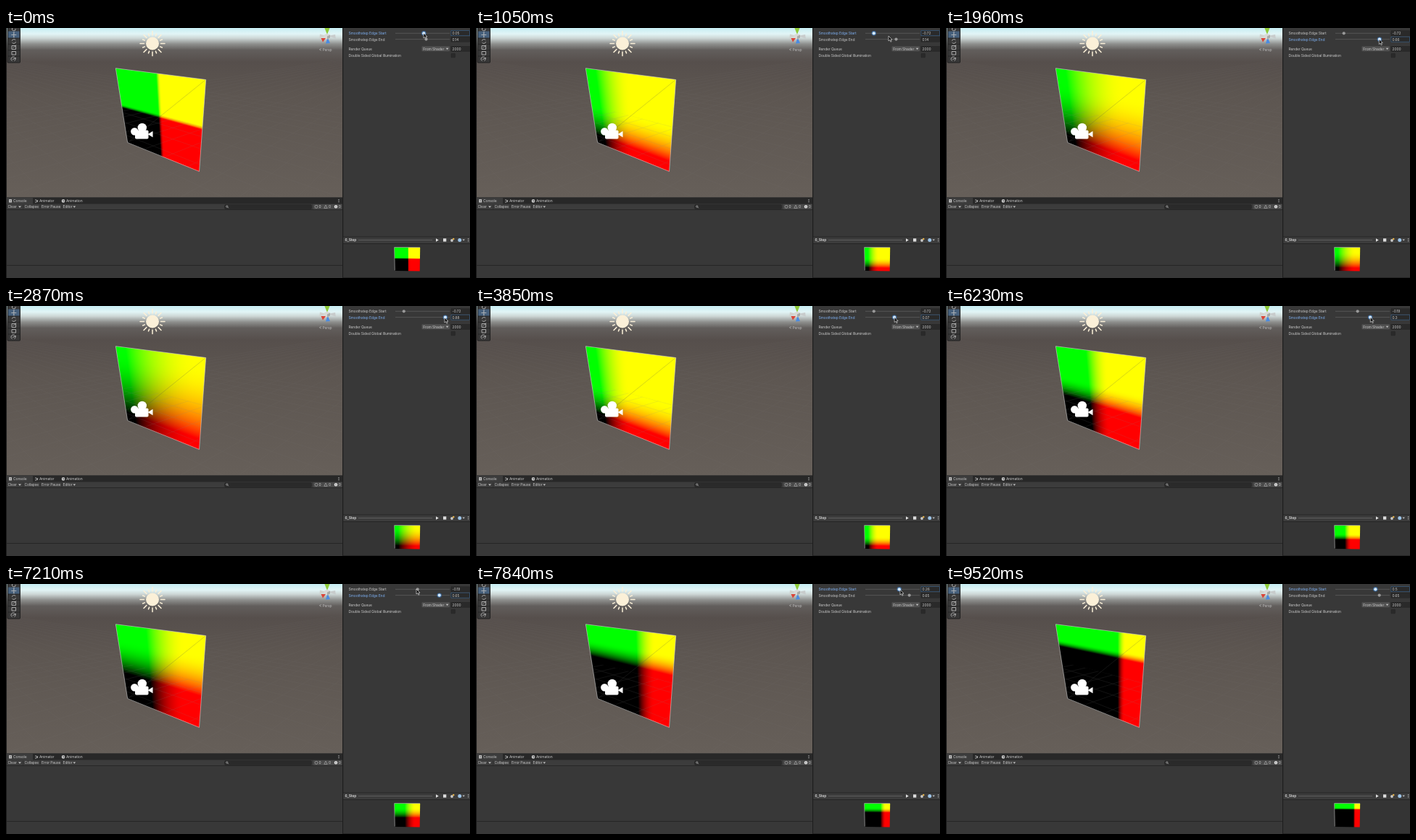
An HTML page for the animation above (9800 ms loop, 640 by 346 pixels).

```html
<!DOCTYPE html>
<html lang="en">
<head>
<meta charset="utf-8">
<title>Smoothstep edges</title>
<style>
  html, body { margin: 0; width: 100%; height: 100%; overflow: hidden; background: #383838; }
  #stage { position: relative; width: 640px; height: 346px; overflow: hidden; }
  svg { position: absolute; left: 0; top: 0; }
  .quad { position: absolute; left: 0; top: 0; width: 128px; height: 128px;
    transform-origin: 0 0; background-blend-mode: screen; }
  .soft { position: absolute; inset: 0; filter: blur(.7px); }
  text { font: 5px Inter, Roboto, sans-serif; letter-spacing: -.025em; fill: #c8c8c8; }
  .bold { font-weight: 700; }
  .field { fill: #2a2a2a; stroke: #202020; stroke-width: .4; }
  .track { stroke: #5e5e5e; stroke-width: .8; }
</style>
</head>
<body>
<div id="stage">
  <svg width="640" height="346" viewBox="0 0 640 346">
    <defs>
      <linearGradient id="sky" x2="0" y2="1">
        <stop offset="0" stop-color="#c6edf3"/>
        <stop offset=".035" stop-color="#e2f5f6"/>
        <stop offset=".06" stop-color="#cdd7d6"/>
        <stop offset=".095" stop-color="#8d8e8c"/>
        <stop offset=".13" stop-color="#625e5c"/>
        <stop offset=".2" stop-color="#564f4c"/>
        <stop offset=".4" stop-color="#5d5651"/>
        <stop offset="1" stop-color="#665f59"/>
      </linearGradient>
      <clipPath id="ground"><rect x="1" y="45" width="463" height="189"/></clipPath>
      <clipPath id="lowerQuad"><path d="M161 108L270 136L266 198L168 158Z"/></clipPath>
    </defs>
    <rect width="640" height="346" fill="#383838"/>
    <rect width="464" height="234.500" fill="url(#sky)"/>
    <g clip-path="url(#ground)" opacity=".1"><g id="grid" stroke="#8a8a8a" stroke-width=".6"></g></g>
    <rect width="1" height="346" fill="#1c1c1c"/>

    <!-- console -->
    <rect y="234.500" width="464" height="9.500" fill="#282828"/>
    <rect x="1" y="235" width="36" height="9" fill="#3c3c3c"/>
    <rect x="1" y="243.500" width="463" height="8" fill="#3c3c3c"/>
    <path d="M1 251.500H464M1 328.500H464" stroke="#232323" stroke-width=".8"/>
    <rect x="4" y="237" width="4" height="4.500" rx=".5" fill="#c8c8c8"/>
    <path d="M4.800 238.500H7.200M4.800 240H7.200" stroke="#3c3c3c" stroke-width=".5"/>
    <path d="M40 238H42L44 241M40 241H42L44 238" fill="none" stroke="#c8c8c8" stroke-width=".8"/>
    <circle cx="79" cy="239.400" r="2.300" fill="#c8c8c8"/>
    <path d="M79 238V239.500H80.300" fill="none" stroke="#282828" stroke-width=".6"/>
    <text x="10" y="241.300">Console</text>
    <text x="46" y="241.300">Animator</text>
    <text x="83" y="241.300">Animation</text>
    <text x="2.500" y="249.300">Clear</text>
    <text x="25.500" y="249.300">Collapse</text>
    <text x="49" y="249.300">Error Pause</text>
    <text x="78.500" y="249.300">Editor</text>
    <path d="M17 246.500h4l-2 2.300zM92.500 246.500h3.600l-1.800 2.300z" fill="#c8c8c8"/>
    <path d="M23.500 244V251M47.200 244V251M77 244V251" stroke="#2b2b2b" stroke-width=".6"/>
    <rect class="field" x="301.500" y="244.500" width="120" height="6" rx="1.500"/>
    <circle cx="304.800" cy="247" r="1.200" fill="none" stroke="#c8c8c8" stroke-width=".6"/>
    <path d="M305.600 247.900l1.300 1.300" stroke="#c8c8c8" stroke-width=".7"/>
    <rect x="424" y="244" width="39" height="7" fill="#4a4a4a"/>
    <circle cx="428" cy="247.300" r="2" fill="none" stroke="#aaa" stroke-width=".7"/>
    <path d="M441 245l2.200 4.300h-4.400z" fill="none" stroke="#aaa" stroke-width=".7"/>
    <circle cx="455" cy="247.300" r="2.200" fill="#e4e4e4"/>
    <path d="M455 246v2.400" stroke="#444" stroke-width=".6"/>
    <text x="431.500" y="249.200">0</text>
    <text x="445" y="249.200">0</text>
    <text x="458.700" y="249.200">0</text>
    <path d="M459 237v4.500" stroke="#c8c8c8" stroke-width="1" stroke-dasharray="1 .7"/>

    <!-- inspector -->
    <rect x="464" width="1.200" height="346" fill="#1e1e1e"/>
    <text x="472.500" y="31">Render Queue</text>
    <rect x="573.500" y="25.300" width="38.500" height="7" rx="1" fill="#515151"/>
    <text x="575.300" y="31">From Shader</text>
    <path d="M606.800 27.800h3.600l-1.800 2.200z" fill="#c8c8c8"/>
    <rect class="field" x="614" y="25.300" width="28" height="7"/>
    <text x="615.500" y="31">2000</text>
    <text x="472.500" y="39.500">Double Sided Global Illumination</text>
    <rect class="field" x="614" y="35.300" width="5.500" height="5.500" rx=".7"/>

    <!-- material preview -->
    <rect x="465.200" y="289" width="175" height="9.500" fill="#3c3c3c"/>
    <rect x="465.200" y="298.500" width="175" height="47" fill="#343434"/>
    <path d="M465 289H640M465 298.500H640M465 345.500H640" stroke="#212121" stroke-width=".8"/>
    <text class="bold" x="467.500" y="295.400">6_Step</text>
    <path d="M486 293.500H588" stroke="#5c5c5c" stroke-width="1"/>
    <path d="M593 291.300l3.800 2.200l-3.800 2.200z" fill="#e0e0e0"/>
    <rect x="603" y="291.300" width="4.300" height="4.300" fill="#ddd"/>
    <circle cx="615" cy="294" r="1.900" fill="#c9c9c9"/>
    <circle cx="617.200" cy="292" r="1.300" fill="#e3b04a"/>
    <circle cx="625.800" cy="293.400" r="2.500" fill="#9cc3e6"/>
    <path d="M629.500 292.500h3.400l-1.700 2z" fill="#c8c8c8"/>
    <path d="M637.700 291v5" stroke="#c8c8c8" stroke-width="1" stroke-dasharray="1 .8"/>
  </svg>

  <div class="soft">
    <div class="quad"></div>
    <div class="quad"></div>
  </div>

  <svg width="640" height="346" viewBox="0 0 640 346">
    <g clip-path="url(#lowerQuad)" opacity=".22"><use href="#grid"/></g>
    <path d="M275.500 71.500L168 158.500" stroke="#555" stroke-width=".6" opacity=".4"/>
    <path d="M151.300 55.700L275.700 71.500L266.500 198.500L167.700 158.500Z" fill="none" stroke="#dcdcdc" stroke-width=".8" opacity=".7"/>
    <path d="M536.300 335.500L535.700 303.500H571" fill="none" stroke="#dcdcdc" stroke-width=".7" opacity=".7"/>

    <!-- camera icon -->
    <g fill="#fff">
      <circle cx="177.300" cy="143.300" r="5.200"/>
      <circle cx="187.800" cy="138" r="6.200"/>
      <rect x="178" y="141.500" width="18.500" height="12" rx="1.800"/>
      <path d="M195.500 147L202.500 142.800V151.200Z"/>
    </g>

    <!-- light icon -->
    <g id="sun" transform="translate(202 21.500)" fill="#fbf0d8" stroke="#fbf0d8" stroke-linecap="round" stroke-width="1.500">
      <circle r="8.200"/>
    </g>

    <!-- tool strip -->
    <rect x="2" y="-1" width="17.500" height="49" rx="1" fill="#373737" stroke="#1a1a1a" stroke-width=".8"/>
    <rect x="3" y="4.500" width="15.500" height="9.300" fill="#46607c"/>
    <path d="M3 14H19M3 22.300H19M3 30.700H19M3 39H19" stroke="#1a1a1a" stroke-width=".6"/>
    <g fill="none" stroke="#c4c4c4" stroke-width=".8">
      <path d="M8.500 0v2.500l1.500 1.500h2l1.500-3"/>
      <path d="M10.800 6v7M7.300 9.500h7M10 6.800l.8-.9l.8.9M10 12.200l.8.900l.8-.9"/>
      <path d="M8.300 17.700a2.800 2.800 0 0 1 5-1M13.500 19.200a2.800 2.800 0 0 1-5 1"/>
      <path d="M8 24.500h5.500v5H8zM10 27.500l4-4"/>
      <path d="M8 32.500h5.500v4.500H8z"/>
      <path d="M8.500 45.500a3 3 0 1 1 3 0M9 43.500l5-2"/>
    </g>

    <!-- axis widget -->
    <g>
      <path d="M441 11L433 8.500L432.500 14Z" fill="#d1d1cd"/>
      <path d="M443 9L439 -1H447Z" fill="#8fcb3b"/>
      <path d="M445 11L454 9L455 15Z" fill="#c8cccc"/>
      <path d="M441 14L434.500 14L437 19.500Z" fill="#db4437"/>
      <path d="M443.500 13L441 21.500L447 21Z" fill="#4c8be0"/>
      <path d="M443 7.500L447 9.500V13.500L443 15.500L439 13.500V9.500Z" fill="#d9d9d6"/>
      <path d="M443 11.500V15.500L447 13.500V9.500Z" fill="#a9aaa7"/>
    </g>
    <path d="M435 28.300l-2.700 1.500l2.700 1.500" fill="none" stroke="#bdbdbd" stroke-width=".6"/>
    <text x="436.500" y="31.800" style="fill:#bdbdbd">Persp</text>

    <g id="rows"></g>
    <path id="cursor" d="M0 0V7L1.700 5.500L2.900 8.200L4.100 7.700L2.900 5.100H5Z" fill="#111" stroke="#f2f2f2" stroke-width=".6"/>
  </svg>
</div>

<script>
const LOOP = 9800, STEP = 70, SIZE = 128;
const NS = 'http://www.w3.org/2000/svg';
const $ = id => document.getElementById(id);

function add(parent, tag, attrs, text = '') {
  const el = document.createElementNS(NS, tag);
  for (const key in attrs) el.setAttribute(key, attrs[key]);
  el.textContent = text;
  return parent.appendChild(el);
}

// Perspective transform of a square onto corners TL, TR, BR, BL.
function project([[x0, y0], [x1, y1], [x2, y2], [x3, y3]]) {
  const ax = x1 - x2, ay = y1 - y2, bx = x3 - x2, by = y3 - y2;
  const sx = x0 - x1 + x2 - x3, sy = y0 - y1 + y2 - y3;
  const den = ax * by - bx * ay;
  const g = (sx * by - sy * bx) / den, h = (ax * sy - ay * sx) / den;
  const u = [x1 - x0 + g * x1, y1 - y0 + g * y1, 0, g].map(n => n / SIZE);
  const v = [x3 - x0 + h * x3, y3 - y0 + h * y3, 0, h].map(n => n / SIZE);
  return `matrix3d(${[...u, ...v, 0, 0, 1, 0, x0, y0, 0, 1].map(n => n.toFixed(8))})`;
}

const quads = [...document.querySelectorAll('.quad')];
quads[0].style.transform = project([[151.3, 55.7], [275.7, 71.5], [266.5, 198.7], [167.7, 158.8]]);
quads[1].style.transform = project([[535.7, 303.7], [571.2, 304], [570.7, 336.5], [536.5, 336]]);

// Ground grid: two families of rays, each from its own vanishing point.
for (const [vx, dir] of [[-160, 1], [620, -1]])
  for (let i = 0; i < 16; i++)
    add($('grid'), 'line', { x1: vx, y1: 18, x2: vx + dir * (180 + i * 105), y2: 300 });

for (let i = 0; i < 16; i++)
  add($('sun'), 'path', { d: `M0 -11.500V${i % 2 ? -14.5 : -17}`, transform: `rotate(${i * 22.5})` });

const knobX = value => 574.5 + 35.7 * value;

const sliders = ['Start', 'End'].map((name, i) => {
  const y = 7.3 + i * 8.3, rows = $('rows');
  const label = add(rows, 'text', { x: 472.5, y: y + 1.9 }, 'Smoothstep Edge ' + name);
  add(rows, 'line', { class: 'track', x1: 537, x2: 612, y1: y, y2: y });
  const halo = add(rows, 'circle', { cy: y, r: 3.2, fill: '#3f78b8', opacity: .75 });
  const knob = add(rows, 'circle', { cy: y, r: 2.1 });
  const box = add(rows, 'rect', { class: 'field', x: 614, y: y - 3.5, width: 25.6, height: 7 });
  const number = add(rows, 'text', { x: 615.5, y: y + 1.9 });
  return (value, focused) => {
    label.style.fill = focused ? '#7eb0f2' : '';
    halo.style.display = focused ? '' : 'none';
    halo.setAttribute('cx', knobX(value));
    knob.setAttribute('cx', knobX(value));
    knob.setAttribute('fill', focused ? '#d6ebff' : '#999');
    box.style.stroke = focused ? '#3a79bb' : '';
    number.textContent = String(+value.toFixed(2));
  };
});

// time, edge start, edge end, cursor x, cursor y
const keys = [
  [0, .05, .14, 576, 7],
  [770, -.72, .14, 549, 7.5],
  [910, -.72, .14, 549, 7.5],
  [1050, -.72, .14, 569, 11],
  [1260, -.72, .14, 579, 15.5],
  [2380, -.72, .93, 607, 15.5],
  [2520, -.72, .93, 607, 15.5],
  [2870, -.72, .88, 605, 16],
  [3920, -.72, .04, 576, 15.5],
  [4270, -.72, .04, 549, 7.5],
  [4970, -.19, .04, 567, 8],
  [5320, -.19, .04, 567, 8],
  [5740, -.19, .04, 576, 15.5],
  [6860, -.19, .65, 598, 15.5],
  [7210, -.19, .65, 566, 7],
  [7280, -.19, .65, 567, 7.5],
  [7840, .26, .65, 585, 8],
  [8820, .5, .65, 592, 7.5],
  [8960, .5, .65, 592, 7.5],
  [9100, .5, .65, 598, -12],
  [LOOP, .5, .65, 598, -12]
];

const smooth = t => t * t * (3 - 2 * t);

function pose(time) {
  const i = keys.findIndex(key => key[0] > time);
  const from = keys[i - 1], to = keys[i];
  const t = (time - from[0]) / (to[0] - from[0]);
  const eased = (t + smooth(t)) / 2;
  return from.slice(1).map((n, k) => n + (to[k + 1] - n) * eased);
}

// Smoothstep ramp over object space -1..1, shown in display gamma.
function ramp(angle, channel, start, end) {
  const stops = [], count = 20;
  for (let i = 0; i <= count; i++) {
    const t = i / count, rgb = [0, 0, 0];
    rgb[channel] = Math.round(255 * smooth(t) ** (1 / 2.2));
    const at = (start + (end - start) * t + 1) * 50;
    stops.push(`rgb(${rgb}) ${at.toFixed(2)}%`);
  }
  return `linear-gradient(${angle}deg, ${stops.join()})`;
}

function draw(time) {
  const [start, end, x, y] = pose(time);
  const endFocused = (time >= 1260 && time < 4270) || (time >= 5740 && time < 7280);
  sliders[0](start, !endFocused);
  sliders[1](end, endFocused);
  const image = ramp(90, 0, start, end) + ',' + ramp(0, 1, start, end);
  for (const quad of quads) quad.style.backgroundImage = image;
  $('cursor').setAttribute('transform', `translate(${x} ${y})`);
}

const origin = performance.now();
function tick() {
  const time = (performance.now() - origin) % LOOP;
  draw(Math.floor(time / STEP) * STEP);
  requestAnimationFrame(tick);
}
tick();
</script>
</body>
</html>
```
